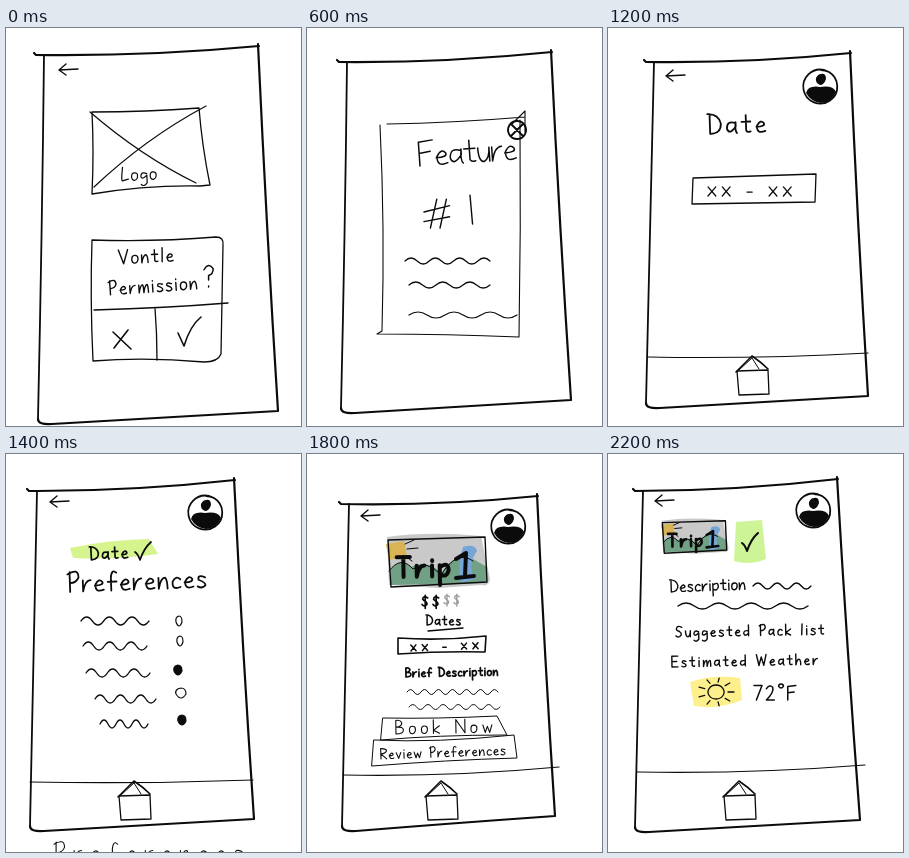
Animation, 295 px wide and 398 px high, one loop 2400 ms. Source, as an HTML page:

```html
<!DOCTYPE html>
<html lang="en">
<head>
<meta charset="utf-8">
<title>App wireframe sketches</title>
<style>
html, body { margin: 0; width: 100%; height: 100%; overflow: hidden; background: #fff; }
svg { display: block; width: 100vw; height: 100vh; }
path { stroke-linecap: round; stroke-linejoin: round; vector-effect: non-scaling-stroke; }
</style>
</head>
<body>
<svg id="stage" viewBox="0 0 295 398"></svg>
<script>
const INK = '#0b0b0b';
const STEP = 200;

// Single-stroke handwriting: ink width, then a path on baseline 0 with cap height 9.
const glyphs = {
  a: [4, 'M4-4.5Q0-6 0-2Q1 1 4-3V-5Q3.5-1 4.5 0'],
  b: [4, 'M0-9V0Q4 0 4-2.5Q3-5 0-3'],
  c: [4, 'M4-4Q2-6 .5-3Q0 1 4-.5'],
  d: [4, 'M4-4Q0-5 0-2Q1 1 4-2V-9V0'],
  e: [4, 'M0-2.5Q4-2.5 3.5-4Q2-6 .3-3Q0 1 4-.5'],
  f: [4, 'M4-8Q2-10 1.5-6V0M0-4H4'],
  g: [4, 'M4-4Q0-6 0-2Q1 0 4-3V2Q2 5 0 3'],
  h: [4, 'M0-9V0Q1-5 3-4.5Q4-4 4 0'],
  i: [1, 'M.5-5V0M.6-7.3V-7'],
  k: [4, 'M0-9V0M4-5L0-2L4 0'],
  l: [1, 'M.7-9L.3 0'],
  m: [6, 'M0-5V0Q1-5 2.5-5Q3-4 3 0Q4-5 5.5-5Q6-4 6 0'],
  n: [4, 'M0-5V0Q1-5 3-5Q4-4 4 0'],
  o: [4, 'M2-5Q0-5 0-2.5Q0 0 2 0Q4-.5 4-3Q4-5 2-5'],
  p: [4, 'M0-5V4M0-4Q4-7 4-2.5Q3 1 0-1'],
  r: [3.5, 'M0-5V0Q1-5 3.5-5'],
  s: [3.5, 'M3.5-4.5Q0-6 .5-3.5Q4-2 3.5-.8Q2 .8 0-.5'],
  t: [4, 'M2-8V-1Q2.5 0 4-.5M0-5H4'],
  u: [4, 'M0-5Q0 0 2 0Q4-1 4-5V0'],
  v: [4, 'M0-5L2 0L4-5'],
  w: [6, 'M0-5L1.5 0L3-4L4.5 0L6-5'],
  y: [4, 'M0-5L2-.5M4-5Q3 0 0 4'],
  B: [5, 'M0-9V0Q5 0 5-2.5Q5-5 0-4.5Q4-5 4-7.5Q3-9.5 0-9'],
  D: [6, 'M1-9V0Q6 0 6-4.5Q5-9 0-9'],
  E: [5, 'M5-9H0V0H5M0-4.5H4'],
  F: [5, 'M5-9L0-8.5V0M0-4.5L4-5'],
  L: [5, 'M1.5-9Q0 0 1 0Q3-.5 5-1'],
  M: [7, 'M0 0L1-9L3.5-3L6-9L7 0'],
  N: [6, 'M0 0V-9L6 0V-9'],
  P: [5, 'M1-9V0M0-8Q5-11 5-6.5Q4-4 1-4'],
  R: [5, 'M0 0V-9Q5-9 5-7Q4-4.5 0-4.5L5 0'],
  S: [5, 'M5-8Q1-10 .5-7Q0-5.5 3-4.5Q6-2 3-.3Q1 .5 0-1'],
  T: [6, 'M0-9H6M3-9V0'],
  V: [6, 'M0-9L3 0L6-9'],
  W: [8, 'M0-9L2 0L4-7L6 0L8-9'],
  X: [6, 'M0-7L6 0M6-7L0 0'],
  1: [1, 'M0-9L.8 0'],
  2: [5, 'M0-7Q2-10 4-8Q5-5 0 0H5'],
  7: [5, 'M0-9H5L1.5 0'],
  $: [5, 'M4.5-7Q1-9 .5-6Q1-5 3-4Q5-2 2.5-1Q1-.5 0-2M2.5-9V1'],
  '°': [3, 'M1.5-10Q0-10 0-8.5Q1.5-6.5 3-8.5Q3-10 1.5-10'],
  '?': [4, 'M0-7.5Q2-11 4-8Q4-5.5 2-5V-3M2-.4V0'],
  '!': [1, 'M1-9L.5-3M.4-.4V0'],
  '#': [8, 'M4-9L2 0M7-9L5 0M0-5L8-7M0-2L8-3.5'],
  '-': [4, 'M0-3H4']
};

const ink = (d, width = 1.3, color = INK, fill = 'none') =>
  `<path d="${d}" stroke="${color}" stroke-width="${width}" fill="${fill}"/>`;
const blob = (d, color) => ink(d, 0, 'none', color);
const group = (transform, ...parts) => `<g transform="${transform}">${parts.join('')}</g>`;

function write(text, x, y, size, { gap = 1, tilt = 0, width = 1.3, color = INK } = {}) {
  let pen = 0, out = '';
  for (const ch of text) {
    const [w, d] = glyphs[ch] || [3, ''];
    if (d) out += group(`translate(${pen.toFixed(2)} 0)`, ink(d, width, color));
    pen += w + gap;
  }
  return group(`translate(${x} ${y}) rotate(${tilt}) scale(${size})`, out);
}

function wave(x, y, end, bumps, height = 6, width = 1.2) {
  const w = (end - x) / bumps;
  return ink(`M${x} ${y}q${w / 2} ${-height} ${w} 0` + `t${w} 0`.repeat(bumps - 1), width);
}

// Top-left, top-right, bottom-left and bottom-right corners.
const phone = (ax, ay, bx, by, cx, cy, dx, dy) =>
  ink(`M${ax} ${ay - 2}l2 2Q${(ax + bx) / 2} ${(ay + by) / 2 + 6} ${bx} ${by}` +
      `M${bx - 1} ${by - 2}Q${(bx + dx) / 2 - 2} ${(by + dy) / 2} ${dx} ${dy}` +
      `Q${(cx + dx) / 2} ${(cy + dy) / 2} ${cx + 14} ${cy}Q${cx} ${cy + 1} ${cx} ${cy - 5}`, 2.2) +
  ink(`M${ax + 10} ${ay}Q${cx + 4} ${(ay + cy) / 2} ${cx} ${cy - 5}`, 1.8);

const back = (x, y) => ink(`M${x + 19} ${y - 1}L${x} ${y}l7-6m-7 6l7 5`, 1.4);
const check = (x, y, width = 1.5) => ink(`M${x} ${y - 8}q3 2 5 8q4-12 11-18`, width);

const avatar = (x, y) => group(`translate(${x} ${y})`,
  ink('M3-17A17 17 0 1 0 8-15Q4-17 0-17', 1.8),
  blob('M0-13Q5-14 5-8Q3-2-1-2Q-6-4-5-9Q-3-13 0-13z', INK),
  blob('M-15 6Q-13-2-1 0Q12-2 15 5Q10 16 0 16Q-10 15-15 6z', INK));

const home = (x, y) => group(`translate(${x} ${y})`,
  ink('M0 15L31 14L32 38L2 39Z', 1.3),
  ink('M-1 16Q8 7 15 0Q24 6 31 13', 1.6), ink('M2 14L15 2L22 13', 1));

const footer = (x, y, end, endY) => ink(`M${x} ${y}Q${(x + end) / 2} ${y + 2} ${end} ${endY}`, 1.2);

const picture = (x, y, scale) => group(`translate(${x} ${y}) scale(${scale})`,
  blob('M-2-2Q40-8 92-3L101 40Q100 48 92 46L50 49L0 46z', '#c9c9c9'),
  blob('M2 46V30Q12 18 22 28Q38 20 52 34Q68 12 84 20L98 28V44z', '#70a184'),
  blob('M-3 5L15 2L18 17L0 21z', '#d9b354'),
  blob('M74 8Q86 4 88 12Q78 26 86 40L72 44Q68 26 74 8z', '#76a5d8'),
  ink('M-1 1L96-2L98 43L2 48Z', 1.4),
  ink('M0 32Q12 16 24 30Q38 20 52 36Q68 10 84 22M16 5L25 1M18 10L29 9M16 17L23 22', 1),
  write('Trip', 8, 38, 2.2, { gap: 3, tilt: -1, width: 4 * scale }),
  ink('M67 20L77 14L76 37M67 39L85 37', 4 * scale));

const logo = () =>
  ink('M86 84Q140 84 193 80Q196 118 204 157L194 158Q140 157 86 166Q88 124 86 84') +
  ink('M84 84Q135 128 190 155M200 78Q140 110 88 159', 1.2) +
  write('Logo', 115, 153, 1.5, { gap: 2.2, tilt: -3, width: 1.2 });

const permission = name => phone(28, 27, 253, 18, 32, 396, 272, 383) + back(53, 42) + logo() +
  ink('M86 212Q150 214 210 209Q218 209 217 217L215 326Q212 334 198 334Q140 329 87 333Q84 270 86 212') +
  ink('M88 282Q160 280 222 275M149 280Q151 305 151 332') +
  name +
  write('Permission', 103, 267, 1.55, { gap: 2.36, tilt: -4, width: 1.4 }) +
  write('?', 198, 259, 2.3, { width: 1.5 }) +
  ink('M107 304L125 321M122 302L108 320M172 305L178 318Q184 298 195 289', 1.6);

const feature = number => phone(30, 34, 245, 24, 34, 385, 264, 372) +
  ink('M80 96Q145 95 218 89M73 97Q78 200 75 303L70 306Q140 306 212 309Q214 200 213 92M205 96L218 83V104', 1.1) +
  ink('M210 93a9 9 0 1 0 .1 0M204 96L216 108M216 96L204 108', 1.9) +
  write('Feature', 113, 138, 2.8, { gap: 1, tilt: -4, width: 1.5 }) +
  write('#', 117, 200, 3.2, { width: 1.4 }) + write(number, 163, 196, 3.2, { width: 1.4 }) +
  wave(98, 233, 183, 7) + wave(102, 257, 183, 6) + wave(102, 287, 210, 6);

const start = () => phone(36, 31, 248, 23, 39, 380, 266, 365) + back(58, 44) + avatar(217, 56) +
  ink('M70 118Q125 122 172 116L175 162Q120 154 70 151Z', 1.5) +
  ink('M71 180Q120 181 169 177L171 222Q120 219 75 221Z', 1.5) +
  ink('M73 241Q120 247 172 238L173 283Q120 277 72 278Z', 1.4) +
  write('Link itinerery', 82, 147, 1.4, { gap: .95, tilt: -1 }) +
  write('Start from Scratch', 80, 207, 1.05, { gap: .8, tilt: -1 }) +
  write('Surprise Me!', 80, 268, 1.1, { gap: 1.9, tilt: -2 }) +
  footer(41, 327, 264, 324) + home(129, 328) +
  ink('M197 398l1-1M204 398l2-4M211 398l1-3', 1.2);

const dates = () => phone(36, 34, 243, 25, 38, 380, 260, 368) + back(58, 48) + avatar(213, 59) +
  write('Date', 100, 106, 2.2, { gap: 2.7, tilt: -2, width: 1.8 }) +
  ink('M85 150L208 146L207 174L84 176Z') + write('XX - XX', 100, 168, 1.3, { gap: 5 }) +
  footer(40, 329, 260, 325) + home(129, 328);

const oval = (x, y, r, filled) =>
  ink(`M${x} ${y - 5}q${-r * 1.3} 1 ${-r} 6q${r} 8 ${r * 2} 0q0-6${-r}-6`, 1.2, INK, filled ? INK : 'none');

const preferences = () => phone(21, 37, 229, 26, 24, 377, 248, 365) + back(44, 48) + avatar(200, 59) +
  blob('M64 94Q100 86 143 85L152 100Q110 106 67 104z', '#d5f48d') +
  write('Date', 84, 106, 1.45, { gap: 2.7, tilt: -3, width: 1.7 }) + check(129, 106, 1.7) +
  write('Preferences', 62, 138, 2.2, { gap: 1.9, tilt: -2, width: 1.8 }) +
  [[75, 167, 143], [77, 192, 141], [80, 219, 144], [89, 245, 150], [94, 270, 142]]
    .map(([x, y, end]) => wave(x, y, end, 6, 8, 1.3)).join('') +
  oval(173, 167, 3) + oval(174, 187, 3) + oval(172, 216, 4, true) + oval(175, 239, 5) + oval(176, 266, 4, true) +
  footer(24, 328, 247, 326) + home(113, 327) +
  write('Preferences', 48, 407, 2.1, { gap: 4.6, width: 1.1 });

const trips = () => phone(20, 27, 238, 16, 24, 377, 252, 365) + back(46, 40) + avatar(205, 52) +
  picture(85, 95, .95) + picture(85, 165, .95) + picture(85, 235, .95) +
  footer(26, 325, 260, 318) + home(118, 326);

const trip = () => phone(32, 50, 231, 42, 35, 377, 248, 362) + back(54, 62) + avatar(202, 73) +
  picture(82, 85, 1) +
  write('$$', 115, 153, 1.3, { gap: 3.4, width: 1.7 }) +
  write('$$', 137, 151, 1.2, { gap: 3.2, color: '#999' }) +
  write('Dates', 119, 171, 1.1, { gap: 2.4, width: 1.5 }) + ink('M121 177L156 174', 1.4) +
  ink('M91 184Q135 187 179 182L178 198Q135 197 91 200Z', 1.6) +
  write('XX - XX', 104, 197, .85, { gap: 7.5, tilt: -2, width: 1.5 }) +
  write('Brief Description', 99, 223, 1, { gap: 2, tilt: -1, width: 1.7 }) +
  wave(100, 238, 191, 13, 5, 1) + wave(102, 253, 193, 12, 5, 1) +
  ink('M76 264Q130 265 190 262L200 281Q130 281 74 286Z', 1) +
  write('Book Now', 89, 280, 1.5, { gap: 4, tilt: -1, width: 1.1 }) +
  ink('M67 286Q130 289 207 281L210 304Q140 306 65 312Z', 1) +
  write('Review Preferences', 74, 305, 1.15, { gap: 2.2, tilt: -2, width: 1.1 }) +
  footer(36, 321, 252, 313) + home(119, 327);

const booking = () => phone(33, 43, 244, 33, 36, 383, 258, 370) + back(55, 57) + avatar(206, 68) +
  picture(87, 92, 1) +
  write('Dates', 118, 170, 1.3, { gap: 2.2, width: 1.5 }) +
  ink('M96 186L188 181L187 203L95 206Z', 1.5) + write('XX - XX', 108, 199, .9, { gap: 6.8 }) +
  wave(98, 232, 190, 12, 5) + wave(102, 252, 192, 12, 5) +
  footer(38, 326, 263, 318) + home(122, 329);

const sun = (x, y) => {
  const rays = Array.from({ length: 9 }, (_, i) => {
    const a = i * Math.PI * 2 / 9, c = Math.cos(a), s = Math.sin(a);
    return `M${x + 12 * c} ${y + 10 * s}L${x + 18 * c} ${y + 14 * s}`;
  }).join('');
  return ink(`M${x} ${y - 7}a8 7 0 1 0 .1 0${rays}`, 1.3);
};

const summary = () => phone(25, 37, 230, 25, 27, 378, 252, 366) + back(47, 47) + avatar(206, 57) +
  picture(55, 68, .65) +
  blob('M128 68L154 66L158 105Q142 112 126 107z', '#cdf597') + check(134, 97, 2.1) +
  write('Description', 62, 138, 1.35, { gap: 1.65, tilt: -2, width: 1.4 }) +
  wave(145, 132, 203, 6, 6, 1.3) + wave(70, 152, 200, 8, 6, 1.4) +
  write('Suggested Pack list', 68, 183, 1.2, { gap: 3, tilt: -1, width: 1.4 }) +
  write('Estimated Weather', 64, 213, 1.2, { gap: 3.2, tilt: -1, width: 1.4 }) +
  blob('M82 228Q105 220 132 224L134 246Q110 256 86 252z', '#fdf08c') + sun(108, 238) +
  write('72°F', 146, 246, 1.6, { gap: 2.7, width: 1.5 }) +
  footer(29, 318, 257, 311) + home(116, 327);

const scenes = [
  permission(write('Vontle', 113, 236, 1.55, { gap: 2.4, tilt: -3, width: 1.4 })),
  group('translate(11.6 6.3) scale(.97)',
    permission(write('Pemlo', 116, 236, 1.3, { gap: 3, tilt: -4, width: 1.4 }))),
  phone(13, 22, 234, 12, 18, 395, 262, 382) + group('translate(-12 40)', logo()),
  feature('1'),
  group('translate(4 -5) scale(.99)', feature('2')),
  start(), dates(), preferences(), trips(), trip(), booking(), summary()
];

const stage = document.getElementById('stage');
stage.innerHTML = scenes.map(s => `<g>${s}</g>`).join('');
const layers = [...stage.children];

function show(time) {
  const current = Math.floor(time / STEP) % layers.length;
  layers.forEach((layer, i) => { layer.style.display = i === current ? '' : 'none'; });
}

const begin = performance.now();
function tick() {
  show(performance.now() - begin);
  requestAnimationFrame(tick);
}
tick();
</script>
</body>
</html>
```
